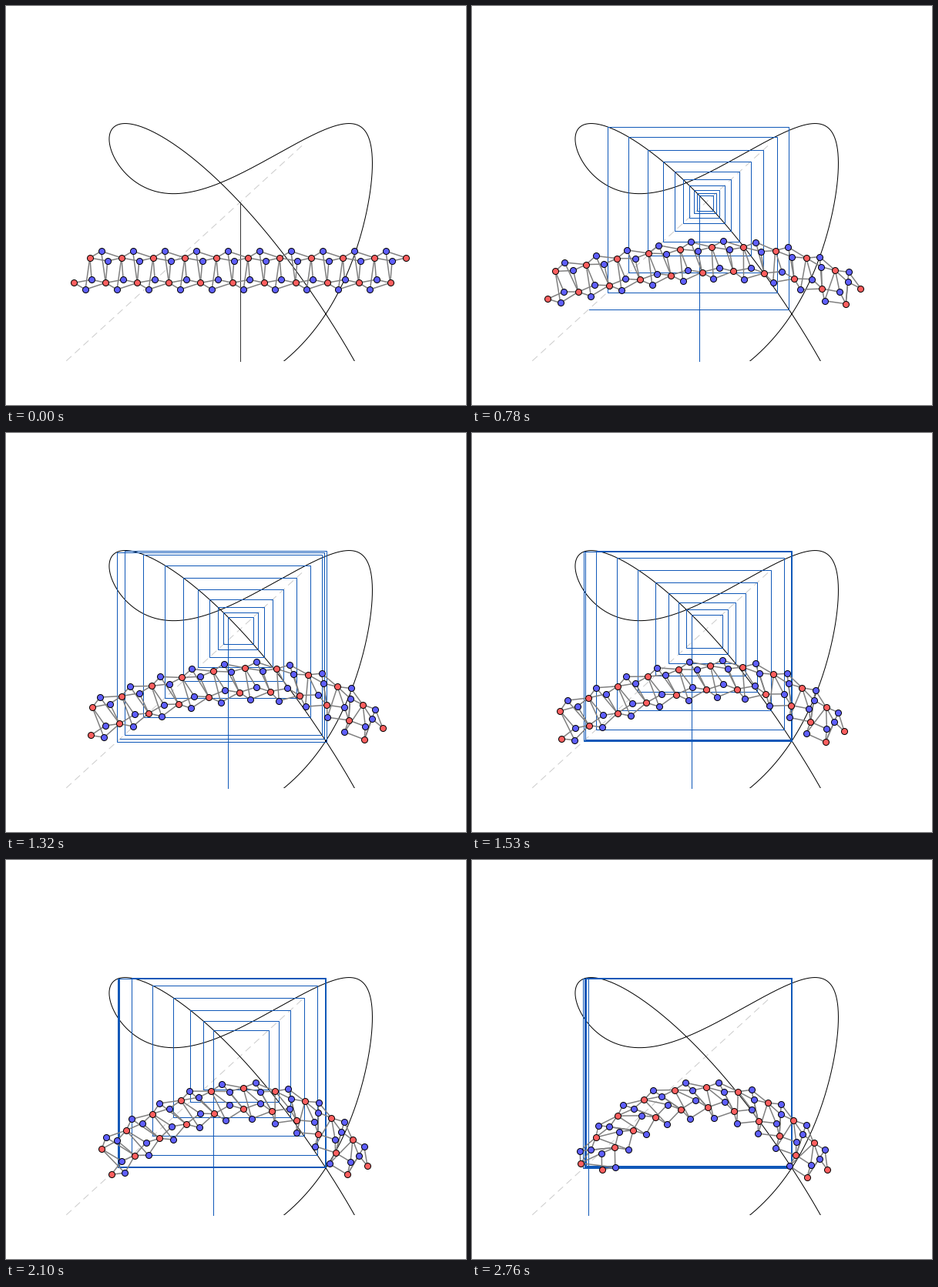
These frames come from a looping animation (597 px wide and 518 px high, 2790 ms). A matplotlib script:

```python
import numpy as np
import matplotlib.pyplot as plt
from matplotlib.animation import FuncAnimation
from matplotlib.collections import LineCollection

W, H, DPI = 597, 518, 100
FRAMES, STEP = 93, 30
PX = 72 / DPI                      # one pixel in points
ASPECT = 0.9135                    # vertical / horizontal data scale
BOTTOM = 461
FIX_X, FIX_Y, MAP_SCALE = 303.5, 255, 528.5
CELL = 41.04
CELLS = 20
BLUE, DARK = "#1058b8", "#333333"

# Rest shape of one cell: a unit triangle of red joints, two blue joints
A, B, C = 0j, 0.5 + 0.75 ** 0.5 * 1j, 1 + 0j
U, V = 0.359 - 0.231j, 0.558 + 0.112j
BARS = [(abs(r - U), abs(r - V)) for r in (A, B, C)]
D_MIN = BARS[1][0] - BARS[1][1]
D_MAX = sum(BARS[0])


def joint(p, q, d, side):
    """Point at distance p from 0 and q from d."""
    x = (p * p - q * q + d * d) / (2 * d)
    return x + 1j * side * np.sqrt(np.maximum(p * p - x * x, 0))


def cell(phi):
    """Red joints and blue distance for a position on the linkage cycle."""
    d = (D_MIN + D_MAX) / 2 - (D_MAX - D_MIN) / 2 * np.cos(phi)
    a = joint(*BARS[0], d, np.sign(np.cos(phi / 2)))
    b = joint(*BARS[1], d, np.sign(np.sin(phi / 2)))
    c = joint(*BARS[2], d, -1)
    return a, b, c, d


def lengths(phi):
    a, b, c, _ = cell(phi)
    return abs(b - a), abs(c - b)


def map_x(l):
    return FIX_X + MAP_SCALE * (l - 1)


def map_y(l):
    return FIX_Y - MAP_SCALE * ASPECT * (l - 1)


# Falling branch, tabulated with increasing first length
branch = np.linspace(1.88, -0.72, 8001)
branch_len = lengths(branch)[0]


def pose(first):
    """Red joints, blue joints and successive lengths for a first length."""
    red = [0j, first * np.exp(1j * np.pi / 3)]
    blue, chain = [], [first]
    for i in range(CELLS):
        phi = np.interp(chain[-1], branch_len, branch)
        pts = np.array([*cell(phi), 0])
        if i % 2:
            pts = pts.conj()
        a, b, c, v, u = pts
        turn = (red[-1] - red[-2]) / (b - a)
        base = red[-2]
        blue += [base + turn * (u - a), base + turn * (v - a)]
        red.append(base + turn * (c - a))
        chain.append(abs(c - b))
    return np.array(red + blue), np.array(chain)


def first_length(n):
    return 1 - n / (3.15 - 3.27e-6 * n ** 3) / MAP_SCALE


# Each pose is turned to fit the one before, with a fixed centre
poses = []
for n in range(FRAMES):
    z, chain = pose(first_length(n))
    if poses:
        last = poses[-1][0]
        z = z - z.mean()
        spin = np.sum(z.conj() * (last - last.mean()))
        z = z * spin / abs(spin) + last.mean()
    poses.append((z, chain))

links = [(i + k, CELLS + 2 + 2 * i + j)
         for i in range(CELLS) for j in range(2) for k in range(3)]

fig = plt.figure(figsize=(W / DPI, H / DPI), dpi=DPI, facecolor="white")
ax = fig.add_axes([0, 0, 1, 1])
ax.set(xlim=(0, W), ylim=(H, 0))
ax.axis("off")
clip = plt.Rectangle((0, 0), W, BOTTOM, transform=ax.transData)

ends = np.array([78.3, 384])
ax.plot(ends, FIX_Y - ASPECT * (ends - FIX_X), color="#cccccc", lw=PX,
        dashes=(9, 6), dash_capstyle="butt", zorder=1)
curve = lengths(np.linspace(0, 4 * np.pi, 3000))
path, = ax.plot(map_x(curve[0]), map_y(curve[1]), color="black", lw=PX,
                zorder=2)
path.set_clip_path(clip)
web, = ax.plot([], [], color=BLUE, lw=PX, solid_joinstyle="miter", zorder=3)
bars = LineCollection([], colors="#7f7f7f", linewidths=1.5 * PX, zorder=4)
ax.add_collection(bars)


def dots(color, z):
    return ax.plot([], [], "o", ms=8 * PX, mfc=color, mec="black",
                   mew=PX, zorder=z)[0]


reds, blues = dots("#ff5f5f", 5), dots("#5f5fff", 6)


def draw(n):
    z, chain = poses[n]
    x, y = 88.3 + CELL * z.real, 359.4 - CELL * ASPECT * z.imag
    xy = np.column_stack([x, y])
    bars.set_segments([xy[list(pair)] for pair in links])
    reds.set_data(x[:CELLS + 2], y[:CELLS + 2])
    blues.set_data(x[CELLS + 2:], y[CELLS + 2:])
    wx = np.repeat(map_x(chain), 2)[:-1]
    wy = np.r_[BOTTOM, np.repeat(map_y(chain[1:]), 2)]
    web.set_data(wx, wy)
    web.set_color(BLUE if n else DARK)
    return bars, reds, blues, web


anim = FuncAnimation(fig, draw, frames=FRAMES, interval=STEP, repeat=True,
                     repeat_delay=0, blit=False)
plt.show()
```
